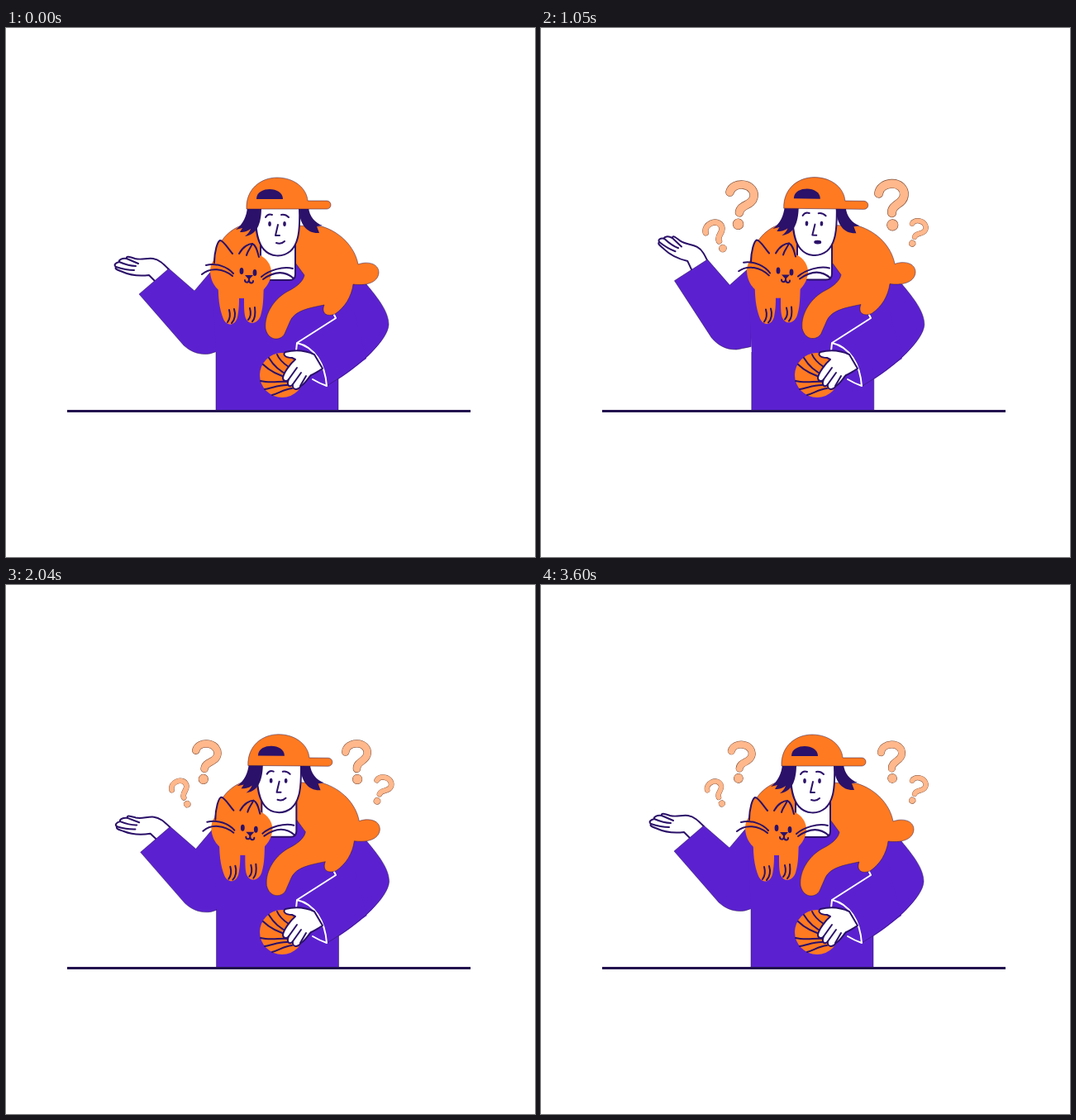
Write an HTML page that moves like this. It is 640 px wide and 640 px high and loops after 3.63 s.

```html
<!DOCTYPE html>
<html lang="en">
<head>
<meta charset="utf-8">
<title>Thinking with a cat</title>
<style>
  html, body { margin: 0; width: 100%; height: 100%; overflow: hidden; background: #fff; }
  svg { display: block; width: 100vw; height: 100vh; }
  .purple { fill: #5b21d0; }
  .orange { fill: #ff7a21; }
  .dark { fill: #2b1169; }
  .white { fill: #fff; }
  .edge { stroke: #26124a; stroke-width: .5; }
  .ink, .chalk { stroke: #2b1169; stroke-width: 2; stroke-linecap: round; stroke-linejoin: round; }
  .chalk { stroke: #fff; }
  .line { fill: none; }
</style>
</head>
<body>
<svg viewBox="0 0 640 640" xmlns="http://www.w3.org/2000/svg">
  <defs>
    <g id="mark" fill="none" stroke-linecap="round">
      <g stroke="#7a4a35">
        <path stroke-width="9" d="M-12 -12C-11 -18 -5 -21 1 -21C9 -21 14 -15 13 -9C12 0 0 -1 0 8"/>
        <circle cy="20" r="5.3" fill="#7a4a35"/>
      </g>
      <g stroke="#ffb88c">
        <path stroke-width="8" d="M-12 -12C-11 -18 -5 -21 1 -21C9 -21 14 -15 13 -9C12 0 0 -1 0 8"/>
        <circle cy="20" r="4.8" fill="#ffb88c"/>
      </g>
    </g>
  </defs>

  <g id="marks"></g>

  <g id="arm">
    <g id="palm" class="ink">
      <path class="white" d="M197 292C190 285 185 280 178 279C170 278 164 281 156 279C150 277 145 275 146 279C140 278 136 281 137 283C132 284 130 287 133 289C131 292 136 293 141 295C152 300 164 300 173 299L181 307"/>
      <path class="line" d="M146 279L160 285M137 283C144 286 150 288 157 288M133 289C142 292 148 293 155 293"/>
    </g>
    <path class="purple edge" d="M161 322L197 291L228 318L250 292L264 388Q253 392 247 394C234 396 224 392 215 384Z"/>
  </g>

  <g id="torso">
    <path class="purple" d="M254 463L254 391L249 292L310 275L400 285L436 310C450 327 463 343 463 359C462 378 428 409 402 425L402 463Z"/>
    <path class="purple" d="M388 433L352 381L420 340L436 400Z"/>
    <path class="line edge" d="M254 463V392M436 310C450 327 463 343 463 359C462 378 428 409 388 433M402 425V463"/>
  </g>

  <path class="chalk line" d="M396 345L399 351L352 381L351 391M352 381C374 386 386 407 388 433C382 431 376 428 371 425"/>
  <circle class="orange" cx="334" cy="420" r="27"/>
  <path class="ink line" d="M328 395C330 400 336 406 342 410M318 399C324 409 332 416 342 420M311 407C320 416 332 421 344 424M308 427C320 430 330 427 344 428M313 437C322 436 330 431 342 432M322 444C330 442 336 437 346 436"/>
  <g class="ink">
    <path class="white" d="M373 395C362 390 350 389 338 392C334 395 338 399 346 399L350 401C344 406 336 417 335 423C335 428 340 428 342 425C339 432 343 436 347 431C346 437 352 440 357 433C362 430 366 423 369 420C374 418 378 415 383 412Z"/>
    <path class="line" d="M342 425L352 411M347 431L357 417M356 433L363 421"/>
  </g>

  <g id="cat">
    <path class="orange edge" d="M250 300C249 270 262 245 290 237L382 240C405 247 422 265 426 286C436 282 451 284 451 296C450 309 434 312 420 310C418 325 410 338 398 346C388 350 381 345 385 335C365 339 350 342 344 354L337 370C333 378 318 380 314 364C312 345 326 326 342 318C354 312 360 305 361 299L350 284L309 284L300 320L256 310Z"/>
    <path class="white ink" d="M308 250V296C308 302 314 305 322 305H343C348 305 350 302 350 298V250Z"/>
    <path class="orange" d="M257 300C256 325 258 340 263 352C267 361 277 361 280 350C282 340 282 333 282 327L288 327C288 340 288 348 291 353C296 360 305 357 308 348C312 335 311 325 312 310Z"/>
    <path class="orange" d="M247 293C248 277 262 270 284 270C306 270 321 280 321 296C320 313 305 327 284 327C263 326 247 314 247 293Z"/>
    <g class="ink orange">
      <path d="M252 284C252 270 256 258 259 257C263 257 268 266 274 273"/>
      <path d="M282 273C287 264 294 261 298 261C303 263 304 270 306 277"/>
    </g>
    <path class="ink line" d="M298 261C296 266 292 270 291 275M270 341C272 348 271 352 268 356M276 340C278 346 277 353 273 357M295 339C297 346 296 350 293 353M301 338C302 346 301 352 298 355"/>
    <path id="whiskers" class="ink line" d="M242 287C255 284 268 289 275 297M237 298C247 289 263 291 274 300"/>
    <path class="ink line" d="M309 301C318 293 335 288 347 291M311 304C325 294 338 294 348 303"/>
    <path class="dark" d="M289 299H299L294 304.500Z"/>
    <path class="ink line" d="M294 303V305C293 309 289 308 289 305M294 305C294 309 299 310 299 306"/>
    <g id="catOpen" class="dark">
      <ellipse cx="285" cy="294" rx="2.400" ry="4"/>
      <ellipse cx="301" cy="296" rx="2.400" ry="4"/>
    </g>
    <path id="catShut" class="ink line" d="M282 293Q285 295 287 294M298 296Q301 297 303 295"/>
  </g>

  <g id="head">
    <path class="white ink" d="M302 215C301 240 303 258 312 268C320 277 334 278 344 270C354 261 356 245 355 215Z"/>
    <g class="dark">
      <path d="M292 217H309C309 232 306 250 289 252C293 249 295 246 296 243C291 247 286 247 283 247L286 242L278 244C287 237 291 228 292 217Z"/>
      <path d="M354 217H366C367 228 374 236 383 239L376 240L379 248C365 249 355 239 354 217Z"/>
      <ellipse cx="319" cy="237" rx="1.800" ry="2.900"/>
      <ellipse cx="337" cy="237" rx="1.800" ry="2.900"/>
    </g>
    <path id="brows" class="ink line" d="M314 229Q317 224 322 226M333 226Q338 225 342 229"/>
    <path class="ink line" d="M329 238L326 251H331"/>
    <path id="smile" class="ink line" d="M327 260Q333 262 337 258"/>
    <ellipse id="gasp" class="dark" cx="332.500" cy="259.500" rx="4.500" ry="2.300"/>
    <path class="orange edge" d="M291 219C290 195 308 181 328 181C350 181 364 195 365 209H388A5 5 0 0 1 388 219Z"/>
    <path class="dark" d="M303 207C303 198 312 195 319 195C327 195 335 199 335 207Z"/>
  </g>

  <path d="M74 463.500H562" stroke="#22104e" stroke-width="3"/>
</svg>
<script>
  const LOOP = 3630;
  const el = id => document.getElementById(id);

  // Rows of [time, value], eased between neighbours.
  function track(rows, t) {
    const i = rows.findIndex(row => row[0] > t);
    if (i === 0) return rows[0][1];
    if (i < 0) return rows[rows.length - 1][1];
    const [t0, a] = rows[i - 1], [t1, b] = rows[i];
    const u = (t - t0) / (t1 - t0);
    return a + (b - a) * (1 - Math.cos(Math.PI * u)) / 2;
  }

  const sway = [[0, 0], [650, .85], [1050, 1], [1560, 0], [2350, 1], [2490, 1], [3150, 0]];
  const lift = [[0, 0], [500, -.15], [750, 0], [1050, 1], [1330, -.1], [1560, 0]];
  const wrist = [[0, 0], [450, -9], [750, -5], [1050, 12], [1330, -9], [1560, 0], [2490, -4], [3150, 0]];
  const settle = [[1560, 1.02], [2490, 1.08], [3150, 1.03], [3600, 1]];

  const marks = [
    { x: 241, y: 214, size: 1, turn: 6, pop: [[660, 0], [750, .37], [930, 1.25], [1050, 1.17]] },
    { x: 424, y: 214, size: 1, turn: -3, pop: [[630, 0], [750, .62], [930, 1.38], [1050, 1.22]] },
    { x: 212.500, y: 252, size: .7, turn: -27, pop: [[570, 0], [750, .9], [900, 1.25], [1050, 1.17]] },
    { x: 454, y: 247.500, size: .7, turn: 20, pop: [[720, 0], [750, .08], [1050, 1], [1200, 1.15]] }
  ];
  for (const m of marks) {
    m.rows = [...m.pop, ...settle];
    m.node = document.createElementNS("http://www.w3.org/2000/svg", "use");
    m.node.setAttribute("href", "#mark");
    el("marks").append(m.node);
  }

  const move = (node, value) => node.setAttribute("transform", value);
  const show = (id, on) => el(id).setAttribute("visibility", on ? "visible" : "hidden");

  function draw(t) {
    const s = track(sway, t), up = track(lift, t);
    move(el("torso"), `translate(${.8 * s} 0)`);
    move(el("cat"), `translate(${2 * s} ${-.5 * s})`);
    move(el("head"), `translate(${2.2 * s} ${-.4 * s}) rotate(${.7 * s} 328 260)`);
    move(el("arm"), `translate(${2.5 * s - 9.5 * up} ${2 * s - 8 * up}) rotate(${8 * up} 238 370)`);
    move(el("palm"), `rotate(${track(wrist, t)} 186 300)`);
    move(el("whiskers"), `rotate(${5 * Math.max(0, up)} 275 298)`);

    const puzzled = t >= 600 && t < 1300;
    show("gasp", puzzled);
    show("smile", !puzzled);
    move(el("brows"), `translate(0 ${puzzled ? -1.5 : 0})`);

    const blink = t >= 690 && t < 840;
    show("catShut", blink);
    show("catOpen", !blink);

    for (const m of marks) {
      const k = track(m.rows, t) * m.size;
      move(m.node, `translate(${m.x} ${m.y}) rotate(${m.turn}) scale(${k})`);
      m.node.setAttribute("visibility", k > .01 ? "visible" : "hidden");
    }
  }

  const start = performance.now();
  function tick() {
    draw((performance.now() - start) % LOOP);
    requestAnimationFrame(tick);
  }
  tick();
</script>
</body>
</html>
```
